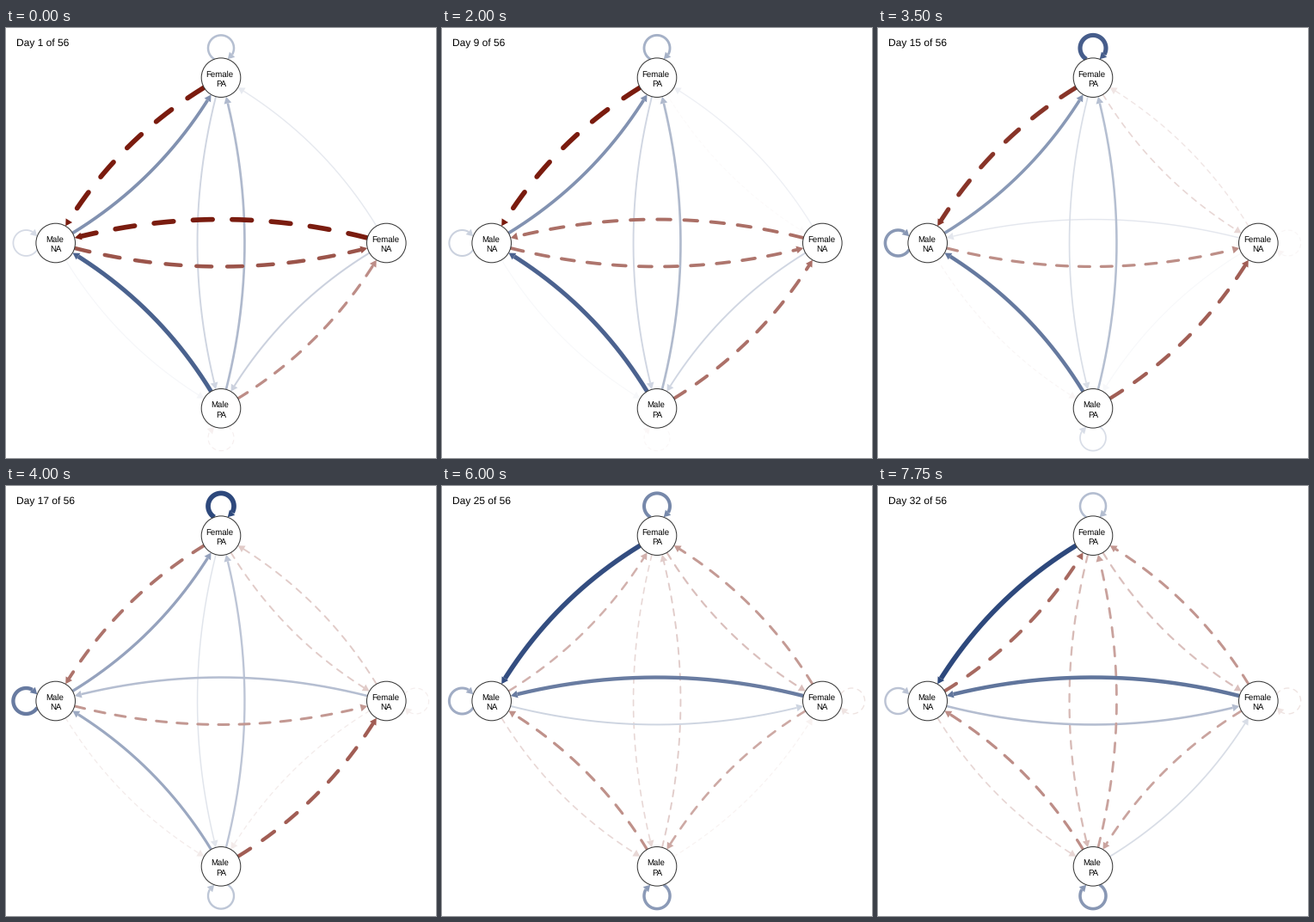
A matplotlib script that plays this animation: 500 px wide and 500 px high, repeating every 8000 ms.

```python
import numpy as np
import matplotlib
import matplotlib.pyplot as plt
from matplotlib.animation import FuncAnimation
from matplotlib.patches import Circle, Polygon

matplotlib.rcParams["font.family"] = "Liberation Sans"
matplotlib.rcParams["text.hinting"] = "none"

SIZE, DPI = 500, 100
PT = 72 / DPI                      # points per pixel
FRAMES, INTERVAL, TOTAL_DAYS = 32, 250, 56
RADIUS, HEAD, HALF_HEAD = 22.8, 7.5, 4.4
LOOP_RADIUS, LOOP_OFFSET = 15, 34.3
BEND = 0.0714                      # sagitta relative to the chord
POSITIVE = np.array([45, 72, 124]) / 255
NEGATIVE = np.array([122, 27, 14]) / 255

CENTER, ORBIT = 250, 192.3
NODES = {                          # outward direction and label
    "fp": ((0, -1), "Female", "PA"),
    "mn": ((-1, 0), "Male", "NA"),
    "fn": ((1, 0), "Female", "NA"),
    "mp": ((0, 1), "Male", "PA"),
}
DAYS = np.arange(1, FRAMES + 1)


def swing(start, step, mid, width, drift=0):
    """Strength per day that eases by a step around one day."""
    ease = (1 + np.tanh((DAYS - mid) / width)) / 2
    return start + drift * (DAYS - 1) + step * ease


def pulse(start, height, mid, width, drift=0):
    """Strength per day that rises to a peak and falls back."""
    return start + drift * (DAYS - 1) + height * np.exp(-((DAYS - mid) / width) ** 2)


# Signed strength of every edge: blue above zero, dashed red below.
STRENGTHS = {
    ("fp", "mn"): swing(-1, 2, 19, 2.8),
    ("mn", "fp"): swing(.6, -1.28, 22.7, 4.5),
    ("mp", "mn"): swing(.86, -1.36, 18.4, 3),
    ("mn", "mp"): swing(.05, -.23, 16, 5),
    ("fn", "mn"): swing(-1.04, 1.8, 13, 6.5),
    ("mn", "fn"): swing(-.75, .55, 20, 1.5, drift=.018),
    ("fp", "mp"): swing(.23, -.55, 22, 6),
    ("mp", "fp"): swing(.38, -.8, 22.5, 4.5),
    ("fp", "fn"): swing(0, -.28, 14, 4),
    ("fn", "fp"): swing(.12, -.58, 16, 5),
    ("fn", "mp"): swing(.25, -.65, 16.8, 5),
    ("mp", "fn"): swing(-.5, 1.2, 23.4, 4, drift=-.016),
    ("fp", "fp"): pulse(.35, .75, 18.8, 6.5),
    ("mn", "mn"): pulse(.2, .52, 19, 5.5, drift=.004),
    ("mp", "mp"): swing(-.07, .64, 16, 5),
    ("fn", "fn"): swing(0, -.12, 16, 3.5),
}


def position(name):
    return CENTER + ORBIT * np.array(NODES[name][0])


def distance(points, origin):
    return np.hypot(*(points - origin).T)


def quarter_turn(v):
    return np.array([-v[1], v[0]])


def path(a, b):
    """Points from one node to another, or around one node's loop."""
    start, end = position(a), position(b)
    t = np.linspace(0, 1, 800)[:, None]
    if a == b:
        out = np.array(NODES[a][0])
        angle = np.pi + 2 * np.pi * t
        points = start + out * LOOP_OFFSET + LOOP_RADIUS * (
            np.cos(angle) * out + np.sin(angle) * quarter_turn(out))
    else:
        chord = end - start
        points = start + chord * t + quarter_turn(chord) * BEND * 4 * t * (1 - t)
    outside = (distance(points, start) > RADIUS) & (distance(points, end) > RADIUS)
    return points[outside]


class Edge:
    def __init__(self, ax, a, b, strengths):
        self.strengths = np.clip(strengths, -1, 1)
        points = path(a, b)
        tip = points[-1]
        body = points[distance(points, tip) > HEAD]
        base = body[-1]
        along = (tip - base) / np.hypot(*(tip - base))
        across = quarter_turn(along) * HALF_HEAD
        self.line, = ax.plot(*body.T, solid_capstyle="butt", dash_capstyle="round")
        self.head = Polygon([tip, base + across, base - across], lw=0)
        ax.add_patch(self.head)

    def update(self, frame):
        value = self.strengths[frame]
        strength = abs(value)
        hue = POSITIVE if value > 0 else NEGATIVE
        color = 1 - strength * (1 - hue)
        self.line.set_linestyle("-" if value > 0 else (0, (4, 4)))
        self.line.set_linewidth((0.8 + 4.9 * strength) * PT)
        self.line.set_color(color)
        self.head.set_facecolor(color)
        for artist in (self.line, self.head):
            artist.set_zorder(1 + strength)
            artist.set_visible(strength > 0.004)


def draw_node(ax, name):
    x, y = position(name)
    _, top, bottom = NODES[name]
    ax.add_patch(Circle((x, y), RADIUS, fc="white", ec="#333333", lw=PT, zorder=3))
    style = dict(size=9.7 * PT, ha="center", va="baseline", zorder=4)
    ax.text(x - 1.3, y - 0.9, top, **style)
    ax.text(x, y + 10.3, bottom, **style)


fig = plt.figure(figsize=(SIZE / DPI, SIZE / DPI), dpi=DPI, facecolor="white")
ax = fig.add_axes([0, 0, 1, 1])
ax.set_xlim(0, SIZE)
ax.set_ylim(SIZE, 0)
ax.axis("off")

edges = [Edge(ax, a, b, strengths) for (a, b), strengths in STRENGTHS.items()]
for name in NODES:
    draw_node(ax, name)
title = ax.text(12, 22, "", size=12 * PT, va="baseline", zorder=4)


def update(frame):
    title.set_text(f"Day {DAYS[frame]} of {TOTAL_DAYS}")
    for edge in edges:
        edge.update(frame)
    return []


anim = FuncAnimation(fig, update, frames=FRAMES, interval=INTERVAL,
                     repeat=True, repeat_delay=0)
plt.show()
```
